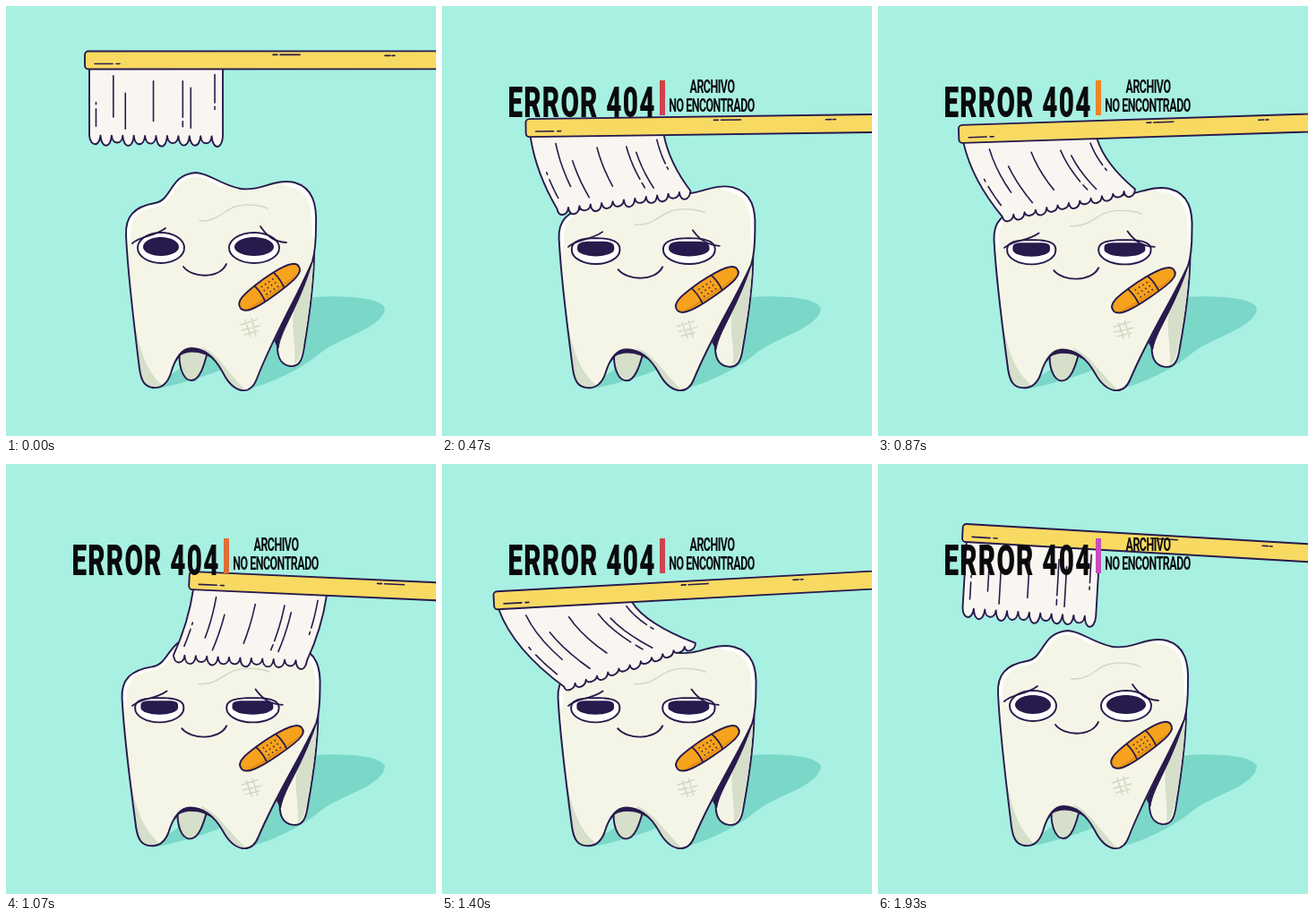
These frames come from a looping animation (480x480 px, 1.96 s). An HTML page with a canvas:

```html
<!DOCTYPE html>
<html lang="es">
<head>
<meta charset="utf-8">
<title>Error 404</title>
<style>
html, body { margin: 0; height: 100%; overflow: hidden; background: #a7f0e2; }
canvas { display: block; width: 480px; height: 480px; }
</style>
</head>
<body>
<canvas id="stage" width="480" height="480"></canvas>
<script>
const ctx = document.getElementById('stage').getContext('2d');
const LOOP = 1960;
const INK = '#281a4c', CREAM = '#f5f5e7', SHADE = '#d5dfca';

// time, x of the handle's end, height above the tooth, extra tilt in degrees
const STROKES = [
  [0, 88, 83, 1.9], [100, 88, 83, 1.9], [160, 88, 83, .6], [300, 134, 35, 5.5],
  [535, 85, 0, 0], [735, 258, 0, 0], [920, 57, 0, 0], [1150, 258, 0, 0],
  [1395, 57, 0, 0], [1640, 258, 0, 0], [1930, 95, 65, 5], [LOOP, 88, 83, 1.9]
];
// time, top hue, bottom hue, saturation of the divider
const HUES = [
  [0, 305, 305, 55], [300, 326, 326, 55], [630, 390, 371, 70], [870, 389, 388, 85],
  [1230, 376, 373, 64], [1630, 325, 325, 53], [1930, 304, 304, 52], [LOOP, 304, 304, 52]
];

const lerp = (a, b, p) => a + (b - a) * p;
const clamp01 = v => Math.max(0, Math.min(1, v));

function sample(keys, t) {
  const i = keys.findIndex(k => k[0] > t);
  const a = keys[i - 1], b = keys[i];
  const p = (1 - Math.cos(Math.PI * (t - a[0]) / (b[0] - a[0]))) / 2;
  return a.slice(1).map((v, j) => lerp(v, b[j + 1], p));
}

function draw(path, fill, stroke, width = 1.9) {
  if (fill) { ctx.fillStyle = fill; ctx.fill(path); }
  if (stroke) { ctx.strokeStyle = stroke; ctx.lineWidth = width; ctx.stroke(path); }
}

const shape = (d, fill, stroke, width) => draw(new Path2D(d), fill, stroke, width);

const TOOTH = new Path2D(`M212 186C228 187 238 199 262 204C285 207 300 192 322 197
  C343 203 347 222 346 245C346 262 345 275 342 285C325 325 300 365 280 416
  C276 427 270 430 263 429C252 427 246 417 242 409C235 396 224 382 207 382
  C195 382 188 396 184 410C180 422 173 427 164 426C155 425 151 419 149 405
  C144 365 136 300 134 256C133 235 143 224 166 220C186 217 182 188 212 186Z`);

// an ellipse whose upper half flattens under a lowered lid
function oval(x, y, rx, up, down, lid) {
  const p = new Path2D(), power = lerp(1, .45, lid);
  for (let a = Math.PI; a < 2 * Math.PI; a += .08) {
    const c = Math.cos(a), s = -Math.sin(a);
    p.lineTo(x + rx * Math.sign(c) * Math.abs(c) ** power, y - up * Math.max(0, s) ** power);
  }
  p.ellipse(x, y, rx, down, 0, 0, Math.PI);
  p.closePath();
  return p;
}

function eye(x, rx, squash) {
  const y = 270 - 2 * squash;
  draw(oval(x, y, rx, 17 - 5 * squash, 17 - squash, squash * .5), '#fff', INK);
  draw(oval(x, y - 1, rx - 6, 11 - 3 * squash, 10 - 2 * squash, squash), INK);
}

function shifted(dx, d) {
  ctx.save();
  ctx.translate(dx, 0);
  shape(d, null, INK, 1.8);
  ctx.restore();
}

function bandage() {
  ctx.save();
  ctx.translate(294, 313.5);
  ctx.rotate(-.6);
  shape('M-40 2C-41-8 -28-10 0-11C28-11 40-8 40-1C41 8 28 10 0 11C-28 12 -39 9 -40 2Z', '#f6a21c', INK);
  shape('M-35 6Q0 9 35 5Q28 8 0 9Q-30 10 -35 6', '#e58c12');
  shape('M-13-10Q-11 0 -13 10M13-10Q15 0 13 10', null, INK, 1.7);
  ctx.fillStyle = INK;
  for (let x = -7; x <= 8; x += 5)
    for (let y = -5; y <= 5; y += 5) ctx.fillRect(x - .7, y - .7, 1.5, 1.5);
  ctx.restore();
}

function tooth(squash) {
  ctx.save();
  ctx.translate(240, 430);
  ctx.scale(1 + .042 * squash, 1 - .03 * squash);
  ctx.translate(-240, -430);

  // back roots
  shape('M344 275C344 310 338 350 333 380C331 396 327 403 317 402C305 400 302 390 303 372Z', CREAM, INK);
  shape('M343 286C341 325 336 355 331 382Q328 396 322 400C325 375 314 350 326 322Z', SHADE);
  shape('M343 282L300 374L304 382C307 360 328 335 343 282Z', INK, INK, 1);
  shape('M194 384C192 400 197 418 207 418C216 418 221 402 225 386Z', SHADE, INK);
  shape('M186 402C192 378 222 374 234 397C222 385 203 384 195 390Z', INK);

  // crown with its light and shade
  draw(TOOTH, CREAM);
  ctx.save();
  ctx.clip(TOOTH);
  shape('M135 262C132 236 143 224 166 220C186 217 182 188 212 186C225 187 231 193 240 197M312 196C343 200 347 222 346 255', null, '#fff', 9);
  shape('M140 330C147 385 158 412 180 428H148Z', SHADE);
  shape('M218 380C238 388 250 414 270 431H246Z', SHADE);
  ctx.restore();
  draw(TOOTH, null, INK);

  shape('M216 240C242 241 244 221 270 222Q284 222 292 226', null, '#cfd9c8', 1.5);
  shape('M262 356L280 350M263 362L283 357M266 367L281 363M267 351L273 369M274 349L279 368', null, '#d2d8c5', 1.5);

  eye(173 + squash, 26, squash);
  eye(277 - 3 * squash, 28, squash);
  shifted(4 * squash, 'M141 265C150 256 165 258 178 248');
  shifted(-7 * squash, 'M284 246C292 258 300 263 313 264');
  shape('M198 291C208 304 238 305 246 288', null, INK);
  bandage();
  ctx.restore();
}

function bristles(lean, contact) {
  const right = Math.max(lean, 0), left = Math.min(lean, 0);
  const side = (x, low) => ({ x, cx: x + .2 * lean, cy: 20 + (low - 20) * .5, ex: x + lean, ey: low });
  const L = side(5, 94 + .24 * right);
  const R = side(154, 95 - 5 * contact - .3 * right - .2 * left);
  const along = (s, v) => [
    (1 - v) ** 2 * s.x + 2 * v * (1 - v) * s.cx + v * v * s.ex,
    (1 - v) ** 2 * 20 + 2 * v * (1 - v) * s.cy + v * v * s.ey
  ];
  const point = (u, v) => {
    const a = along(L, v), b = along(R, v);
    return [lerp(a[0], b[0], u), lerp(a[1], b[1], u)];
  };

  const body = new Path2D(), count = 12;
  const bulge = lerp(13, 7, clamp01(Math.abs(lean) / 50));
  body.moveTo(L.x, 20);
  body.quadraticCurveTo(L.cx, L.cy, L.ex, L.ey);
  for (let i = 0; i < count; i++) {
    const [ax, ay] = point(i / count, 1), [bx, by] = point((i + 1) / count, 1);
    const depth = bulge * (1 + .2 * Math.sin(i * 2.4));
    body.bezierCurveTo(ax + 1, ay + depth, bx - 1, by + depth, bx, by);
  }
  body.quadraticCurveTo(R.cx, R.cy, R.x, 20);
  draw(body, '#f9f5f0', INK);

  const hairs = [
    [.05, .5, .53], [.05, .6, .86], [.18, .1, .72], [.27, .36, .9], [.48, .18, .78],
    [.7, .18, .72], [.7, .78, .86], [.76, .28, .88], [.94, .08, .5], [.94, .56, .6]
  ];
  const lines = new Path2D();
  for (const [u, from, to] of hairs) {
    lines.moveTo(...point(u, from));
    for (let k = 1; k <= 5; k++) lines.lineTo(...point(u, lerp(from, to, k / 5)));
  }
  draw(lines, null, INK, 1.6);
}

function brush(x, lift, tilt, contact) {
  const bend = 163 - x;
  const lean = Math.sign(bend) * Math.abs(bend) ** 1.4 * .1 * contact;
  ctx.save();
  ctx.translate(x, 119.5 + 14 * ((258 - x) / 170) ** 3 - lift);
  ctx.rotate(((x - 138) / 26 + tilt) * Math.PI / 180);
  bristles(lean, contact);
  const handle = new Path2D();
  handle.roundRect(0, 0, 520, 20, 4);
  draw(handle, '#f8da62', INK);
  shape('M11 14H31M35 14H39M210 4H215M218 4H240M335 5H341M343 5H346', null, INK, 1.6);
  ctx.restore();
}

function label(text, x, y, font, spacing) {
  ctx.save();
  ctx.translate(x, y);
  ctx.scale(.62, 1); // condensed lettering
  ctx.font = font + ' Roboto, "Liberation Sans", sans-serif';
  ctx.letterSpacing = spacing;
  ctx.textAlign = 'center';
  ctx.fillStyle = '#0a0a0c';
  ctx.fillText(text, 0, 0);
  ctx.restore();
}

function message(t) {
  const [top, bottom, sat] = sample(HUES, t);
  const paint = ctx.createLinearGradient(0, 83, 0, 122);
  paint.addColorStop(0, `hsl(${top % 360}, ${sat}%, 54%)`);
  paint.addColorStop(1, `hsl(${bottom % 360}, ${sat}%, 54%)`);
  ctx.fillStyle = paint;
  ctx.fillRect(243, 83, 6, 39);
  label('ERROR 404', 156, 124, '900 47.8px', '2px');
  label('ARCHIVO', 301.5, 97, '600 20px', '-.8px');
  label('NO ENCONTRADO', 301, 118, '600 20px', '-.8px');
}

const start = performance.now();

function frame() {
  const t = (performance.now() - start) % LOOP;
  const [x, lift, tilt] = sample(STROKES, t);
  const contact = clamp01(1 - lift / 25);
  ctx.lineCap = ctx.lineJoin = 'round';
  ctx.fillStyle = '#a7f0e2';
  ctx.fillRect(0, 0, 480, 480);
  shape('M162 428C190 424 220 414 246 404L262 430C295 422 330 405 350 388C372 370 420 360 423 338C420 325 375 323 345 325C300 330 240 370 162 428Z', '#7bd7c8');
  tooth(contact);
  brush(x, lift, tilt, contact);
  if (t >= 100) message(t);
  requestAnimationFrame(frame);
}

frame();
</script>
</body>
</html>
```
